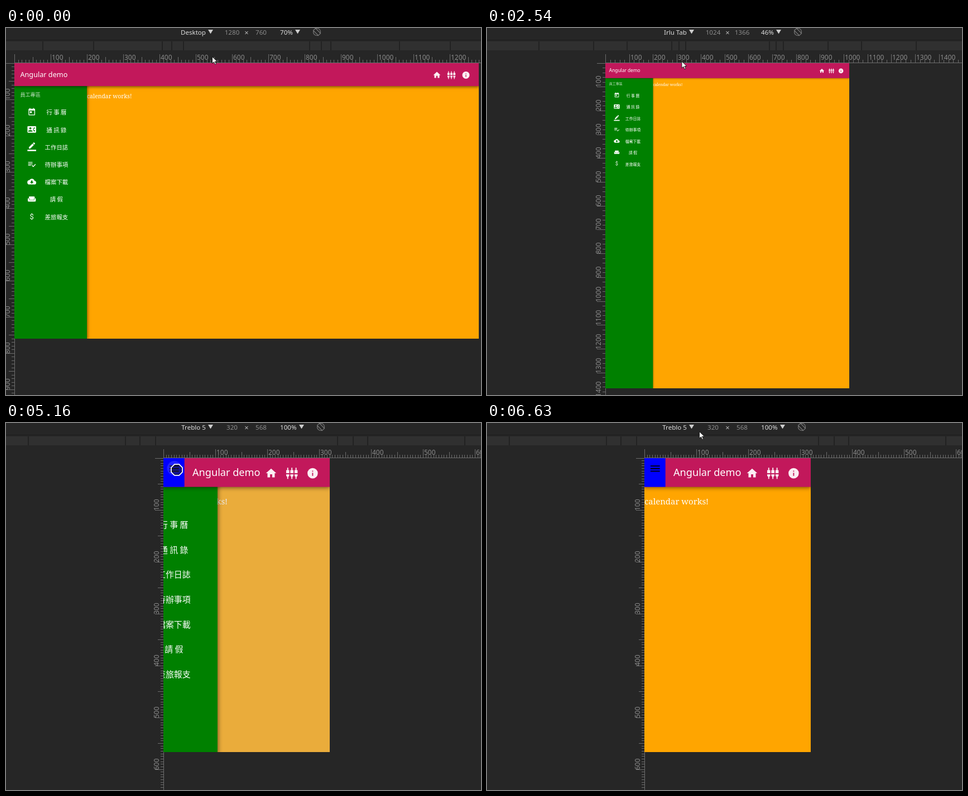
Recreate the animation shown at these times as an HTML page with a canvas. Size 851 px wide and 658 px high, loop 7030 ms.

```html
<!DOCTYPE html>
<html lang="zh-Hant">
<head>
<meta charset="utf-8">
<title>Responsive sidebar demo</title>
<style>
html, body { margin: 0; width: 100%; height: 100%; overflow: hidden; background: #262626; }
canvas { display: block; }
</style>
</head>
<body>
<canvas id="stage" width="851" height="658"></canvas>
<script>
const W = 851, H = 658, LOOP = 7030, TOP = 62.5;
const ctx = document.getElementById('stage').getContext('2d');
const SANS = '"Noto Sans", sans-serif', CJK = '"Noto Sans CJK TC", "Noto Sans CJK", sans-serif';

// w/h: device size; x/scale: where and how large it is shown; breaks: left half of the media bar
const DESKTOP = { name: 'Desktop', w: 1280, h: 760, zoom: 70, x: 15, scale: .65, step: 10, bar: 64, breaks: [66, 157, 280, 297, 318] };
const TABLET = { name: 'Irlu Tab', w: 1024, h: 1366, zoom: 46, x: 212, scale: .427, step: 20, bar: 64, breaks: [93, 191, 251, 331, 344, 356] };
const PHONE = { name: 'Treblo 5', w: 320, h: 568, zoom: 100, x: 282, scale: .93, step: 5, bar: 56, breaks: [40, 214, 240, 268] };

const MENU = [['Responsive', 33], [PHONE.name, 64], [TABLET.name, 86], ['Desktop', 118], ['Edit...', 149]];

const ICON = {
  home: 'M10 20v-6h4v6h5v-8h3L12 3 2 12h3v8z',
  plug: 'M13 2c0-.55-.45-1-1-1s-1 .45-1 1v4H9v6h6V6h-2zM9 16c0 1.3.84 2.4 2 2.82V23h2v-4.18c1.16-.41 2-1.51 2-2.82v-2H9z',
  info: 'M12 2a10 10 0 1 0 0 20a10 10 0 1 0 0-20zM11 17v-6h2v6zM11 9V7h2v2z',
  lines: 'M3 18h18v-2H3zM3 13h18v-2H3zM3 6v2h18V6z',
  today: 'M19 3h-1V1h-2v2H8V1H6v2H5a2 2 0 0 0-2 2v14a2 2 0 0 0 2 2h14a2 2 0 0 0 2-2V5a2 2 0 0 0-2-2zM19 19H5V8h14zM7 10h5v5H7z',
  contact: 'M22 3H2a2 2 0 0 0-2 2v14a2 2 0 0 0 2 2h20a2 2 0 0 0 2-2V5a2 2 0 0 0-2-2zM8 6a3 3 0 1 1 0 6a3 3 0 1 1 0-6zM14 18H2v-1c0-2 4-3.1 6-3.1s6 1.1 6 3.1zM17.85 14h1.64L21 16l-2 2q-3-2.2-3-6t3-6l2 2-1.5 2h-1.65q-.7 2 0 4z',
  edit: 'M17.75 7L14 3.25l-10 10V17h3.75zM20.7 4q.7-.7 0-1.4L18.4.3q-.7-.7-1.4 0L15 2.25 18.75 6zM0 20h24v4H0z',
  check: 'M14 10H2v2h12zM14 6H2v2h12zM2 16h8v-2H2zM21.5 11.5L23 13l-7 7-4.5-4.5L13 14l3 3z',
  cloud: 'M19.35 10A7.5 7.5 0 0 0 5.35 8A6 6 0 0 0 6 20h13a5 5 0 0 0 .35-10zM17 13l-5 5-5-5h3V9h4v4z',
  sofa: 'M21 10a2 2 0 0 0-2 2v3H5v-3a2 2 0 0 0-4 0v5a2 2 0 0 0 2 2h18a2 2 0 0 0 2-2v-5a2 2 0 0 0-2-2zM18 5H6a2 2 0 0 0-2 2v2.15q2 .8 2 2.85v2h12v-2q0-2 2-2.85V7a2 2 0 0 0-2-2z'
};
const ITEMS = [['today', '行 事 曆'], ['contact', '通 訊 錄'], ['edit', '工作日誌'], ['check', '待辦事項'],
  ['cloud', '檔案下載'], ['sofa', '請 假'], ['', '差旅報支']];

// pointer path: time, x, y
const PATH = [[0, 369, 51], [50, 369, 51], [140, 467, 36], [290, 362, 13], [400, 362, 13], [520, 362, 6],
  [800, 362, 6], [1210, 350, 100], [1410, 350, 100], [1680, 345, 91], [2400, 345, 91], [2770, 354, 8],
  [3060, 354, 8], [3610, 357, 65], [3840, 357, 65], [3841, 358, 66], [4110, 358, 66], [4340, 336, 43],
  [4570, 321, 67], [4780, 307, 81], [4870, 307, 81], [4930, 306, 84], [5280, 306, 84], [5850, 524, 261],
  [6150, 524, 261], [6630, 380, 15], [LOOP, 380, 15]];

const clamp = v => Math.max(0, Math.min(1, v));
const easeOut = p => 1 - (1 - clamp(p)) ** 3;

function pointerAt(t) {
  const i = PATH.findIndex(p => p[0] > t);
  const [t0, x0, y0] = PATH[i - 1], [t1, x1, y1] = PATH[i];
  const p = (t - t0) / (t1 - t0);
  return [x0 + (x1 - x0) * p, y0 + (y1 - y0) * p];
}

function drawerAt(t) {
  const since = start => Math.floor((t - start) / 70) * 70;
  if (t < 5160) return 0;
  return t < 6020 ? easeOut((since(5160) + 87) / 400) : 1 - easeOut((since(6020) - 40) / 400);
}

function rect(color, x, y, w, h) {
  ctx.fillStyle = color;
  ctx.fillRect(x, y, w, h);
}

// y is the vertical centre of the capitals
function text(str, x, y, size, color, align = 'left', family = SANS) {
  ctx.font = `${family === CJK ? 300 : 400} ${size}px ${family}`;
  ctx.textAlign = align;
  ctx.fillStyle = color;
  ctx.fillText(str, x, y + size * .37);
}

function shape(points, fill, stroke, width = 1) {
  ctx.beginPath();
  points.forEach(([x, y]) => ctx.lineTo(x, y));
  ctx.closePath();
  ctx.fillStyle = fill;
  ctx.fill();
  if (!stroke) return;
  ctx.strokeStyle = stroke;
  ctx.lineWidth = width;
  ctx.stroke();
}

function icon(name, x, y, color = '#fff') {
  ctx.save();
  ctx.translate(x - 12, y - 12);
  ctx.fillStyle = color;
  ctx.fill(new Path2D(ICON[name]), 'evenodd');
  ctx.restore();
}

function shadowed(scale, dx, dy, draw) {
  ctx.save();
  ctx.shadowColor = 'rgba(0,0,0,.5)';
  ctx.shadowBlur = 8 * scale;
  ctx.shadowOffsetX = dx * scale;
  ctx.shadowOffsetY = dy * scale;
  draw();
  ctx.restore();
}

function drawToolbar(d) {
  const arrow = x => shape([[x - 4.5, 3], [x + 4.5, 3], [x, 10.5]], '#ccc');
  text(d.name, 358, 8, 11.6, '#ddd', 'right');
  arrow(366.5);
  text(d.w, 405, 8, 11.6, '#8c8c8c', 'center');
  text('×', 431, 8, 13, '#bbb', 'center');
  text(d.h, 457, 8, 11.6, '#8c8c8c', 'center');
  text(d.zoom + '%', 491, 8, 11.6, '#ddd');
  const shift = d.zoom === 100 ? 7 : 0;
  arrow(522.5 + shift);
  ctx.strokeStyle = '#777';
  ctx.lineWidth = 1.2;
  ctx.beginPath();
  ctx.arc(557 + shift, 7, 6.5, 0, 7);
  for (const k of [-2, 2]) {
    ctx.moveTo(552 + shift + k, 2 - k);
    ctx.lineTo(562 + shift + k, 12 - k);
  }
  ctx.stroke();
  rect('#1d1d1d', 0, 21, W, 1);
  rect('#303030', 0, 24, W, 16);
  for (const x of d.breaks) for (const b of [x, 861.5 - x]) rect('#222', Math.round(b) - 1, 24, 2, 16);
}

function drawRulers(left, { scale, step }) {
  const line = '#6c6c6c';
  rect(line, left, 62, W - left, 1);
  rect(line, left, 62, 1, H);
  for (let v = 0; v * scale < W; v += step) {
    const size = v % 100 ? v % 50 ? 5 : 10 : 15;
    const x = Math.round(left + v * scale), y = Math.round(TOP + v * scale);
    rect(line, x, 62 - size, 1, size);
    rect(line, left - size, y, size, 1);
    if (!v || v % 100) continue;
    text(v, x + 2, 53, 12, '#8a8a8a');
    ctx.save();
    ctx.translate(left - 12.5, y + 1);
    ctx.rotate(-Math.PI / 2);
    text(v, 0, 0, 12, '#8a8a8a');
    ctx.restore();
  }
}

function drawSidebar(d, x) {
  shadowed(d.scale, 2, 0, () => rect('#008000', x, 0, 200, d.h + 4));
  text('員工專區', x + 16, d.bar + 24, 14, 'rgba(255,255,255,.75)', 'left', CJK);
  ITEMS.forEach(([name, label], i) => {
    const y = d.bar + 73 + 48 * i;
    if (name) icon(name, x + 48, y - 1.5);
    else text('$', x + 48, y - 1.5, 20, '#fff', 'center', 'Roboto, sans-serif');
    text(label, x + 116, y, 16, '#fff', 'center', CJK);
  });
}

function drawPage(d, t) {
  const phone = d === PHONE, open = drawerAt(t), mid = d.bar / 2;
  ctx.save();
  ctx.beginPath();
  ctx.rect(d.x, 63, Math.round(d.w * d.scale), Math.round(d.h * d.scale) - (phone ? 1 : 0));
  ctx.clip();
  ctx.translate(d.x, TOP);
  ctx.scale(d.scale, d.scale);
  rect('#ffa500', -2, 0, d.w + 4, d.h + 4);
  text('calendar works!', phone ? 0 : 200, d.bar + 28, 16, '#fff', 'left', '"Noto Serif", serif');
  if (phone) {
    if (t < 5160) rect('#cc8400', 0, 553, 317, 13);
    if (t < 6020) rect(`rgba(189,189,189,${.6 * open})`, -2, 0, d.w + 4, d.h + 4);
  }
  if (!phone) drawSidebar(d, 0);
  else if (open) drawSidebar(d, 200 * (open - 1));

  shadowed(d.scale, 0, 3, () => rect('#c2185b', -2, -2, d.w + 4, d.bar + 2));
  if (phone) {
    rect('#00f', -1, -1, 41.5, d.bar + 1);
    icon('lines', 20.7, 20.7, '#000');
    if (t >= 5160 && t < 5600) {
      ctx.fillStyle = `rgba(255,255,255,${.13 * (5600 - t) / 440})`;
      ctx.beginPath();
      ctx.arc(21, 20, 14, 0, 7);
      ctx.fill();
    }
  }
  text('Angular demo', phone ? 55.9 : 16, mid, 19.5, '#fff');
  const x = d.w - (phone ? 112.5 : 115.4), y = mid + 1.7, pale = '#fbeef3';
  icon('home', x, y, pale);
  for (const dx of [-8, 0, 8]) icon('plug', x + 40 + dx, y, pale);
  icon('info', x + 80, y, pale);
  ctx.restore();
}

function drawMenu(checked, pointerY) {
  rect('#bbb', 277, 19, 120, 144);
  rect('#fff', 278, 20, 118, 142);
  for (const y of [48, 101, 133]) rect('#e4e4e4', 278, y, 118, 1);
  for (const [label, y] of MENU) {
    if (Math.abs(pointerY - y) < 11) rect('#e6e6e6', 278, y - 11, 118, 22);
    text(label, 311, y, 11.3, '#222');
    if (label !== checked) continue;
    ctx.strokeStyle = '#333';
    ctx.lineWidth = 1.5;
    ctx.stroke(new Path2D(`M290 ${y + 1}l3.5 3.5 7-7.5`));
  }
}

function drawPointer(x, y, touch) {
  if (touch) {
    const ring = r => Array.from({ length: 8 }, (_, i) => {
      const a = (i + .5) * Math.PI / 4;
      return [x + r * Math.cos(a), y + r * Math.sin(a)];
    });
    shape(ring(10.7), 'rgba(0,0,0,.44)', '#fff', 1.8);
    shape(ring(9.3), 'transparent', 'rgba(0,0,0,.6)');
  } else {
    const arrow = [[0, 0], [0, 12], [3, 9.3], [5, 14], [7, 13], [5, 8.6], [9, 8.6]];
    shape(arrow.map(([dx, dy]) => [x + dx + .5, y + dy + .5]), '#fff', '#111', .9);
  }
}

function render(t) {
  const pick = (first, second) => t < first ? DESKTOP : t < second ? TABLET : PHONE;
  const frame = pick(1910, 3840), page = pick(2010, 3940);
  const menu = t >= 830 && t < 1910 || t >= 3090 && t < 3840;
  const [x, y] = pointerAt(t);
  rect('#262626', 0, 0, W, H);
  drawToolbar(frame);
  drawRulers(frame.x, page);
  if (frame !== page) rect('#232323', frame.x + 1, 63, frame.w * frame.scale, frame.h * frame.scale);
  drawPage(page, t);
  if (menu) drawMenu(frame.name, y);
  const inside = y > 62 && x > frame.x && x < frame.x + frame.w * frame.scale;
  drawPointer(x, y, inside && !menu && frame !== DESKTOP);
}

(function tick() {
  render(performance.now() % LOOP);
  requestAnimationFrame(tick);
})();
</script>
</body>
</html>
```
